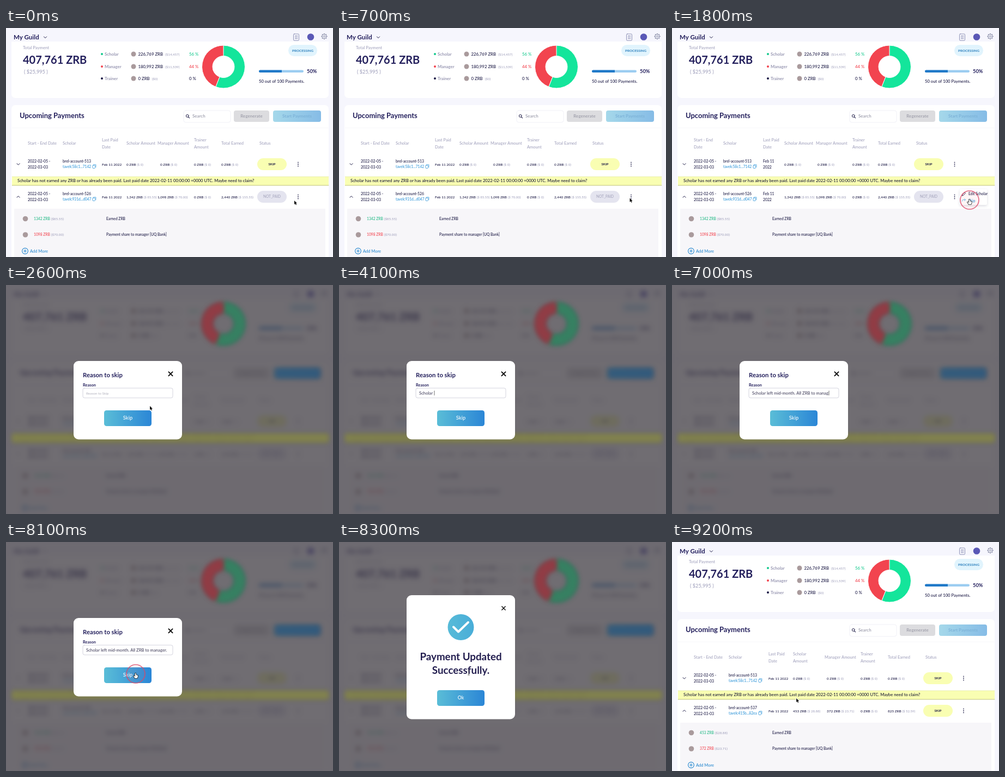
These frames come from a looping animation (600x422 px, 9.3 s). An HTML page with a canvas:

```html
<!DOCTYPE html>
<html lang="en">
<head>
<meta charset="utf-8">
<title>Skip a payment</title>
<style>
  html, body { margin: 0; width: 100%; height: 100%; overflow: hidden; background: #f6f6fd; }
  canvas { display: block; width: 600px; height: 422px; }
</style>
</head>
<body>
<canvas id="stage"></canvas>
<script>
const W = 600, H = 422, LOOP = 9300, STEP = 100;
const NAVY = '#231f5c', INK = '#1c1a45', GREY = '#a3a3be', BLUE = '#2f95d8';
const GREEN = '#14e59b', RED = '#f2444f', YELLOW = '#f9feb2', TOKEN = '#a99a9c';
const REASON = 'Scholar left mid-month. All ZRB to manager.';
const dpr = window.devicePixelRatio || 1;

function makeCanvas(canvas) {
  canvas.width = W * dpr;
  canvas.height = H * dpr;
  const context = canvas.getContext('2d');
  context.scale(dpr, dpr);
  return context;
}

const stage = makeCanvas(document.getElementById('stage'));
let ctx = stage;

// Drawing helpers
function text(str, x, y, size, color = INK, { bold = false, align = 'left' } = {}) {
  ctx.font = `${bold ? 'bold' : '500'} ${size}px Lato, sans-serif`;
  ctx.textAlign = align;
  ctx.fillStyle = color;
  ctx.fillText(str, x, y);
  return ctx.measureText(str).width;
}

function box(x, y, w, h, r, fill, stroke) {
  ctx.beginPath();
  ctx.roundRect(x, y, w, h, r);
  if (fill) { ctx.fillStyle = fill; ctx.fill(); }
  if (stroke) { ctx.strokeStyle = stroke; ctx.lineWidth = 0.8; ctx.stroke(); }
}

function disc(x, y, r, fill) {
  ctx.beginPath();
  ctx.arc(x, y, r, 0, Math.PI * 2);
  ctx.fillStyle = fill;
  ctx.fill();
}

function ring(x, y, r, color, width) {
  ctx.beginPath();
  ctx.arc(x, y, r, 0, Math.PI * 2);
  ctx.strokeStyle = color;
  ctx.lineWidth = width;
  ctx.stroke();
}

function line(points, color, width) {
  ctx.beginPath();
  points.forEach(([x, y]) => ctx.lineTo(x, y));
  ctx.strokeStyle = color;
  ctx.lineWidth = width;
  ctx.lineCap = ctx.lineJoin = 'round';
  ctx.stroke();
}

function chevron(x, y, dir, size = 2.6) {
  line([[x - size, y - dir * size / 2], [x, y + dir * size / 2], [x + size, y - dir * size / 2]], INK, 1);
}

function cross(x, y, r, width) {
  line([[x - r, y - r], [x + r, y + r]], '#000', width);
  line([[x + r, y - r], [x - r, y + r]], '#000', width);
}

function gradient(x0, x1, from, to) {
  const g = ctx.createLinearGradient(x0, 0, x1, 0);
  g.addColorStop(0, from);
  g.addColorStop(1, to);
  return g;
}

function amount(x, y, value, usd, size = 6.4, color = INK) {
  const w = text(`${value} ZRB`, x, y, size, color);
  text(`($${usd})`, x + w + size * 0.25, y, size * 0.95, GREY);
}

// Page sections
function header() {
  text('My Guild', 14, 20.5, 11.5, NAVY, { bold: true });
  chevron(72, 17.2, 1);
  box(527.5, 11, 10, 12, 1.5, null, '#757aa5');
  for (const y of [14.5, 17, 19.5]) line([[530, y], [535, y]], '#757aa5', 0.8);
  disc(559, 16.5, 6.3, '#5a58b6');
  for (let i = 0; i < 8; i++) {
    const a = i * Math.PI / 4, c = Math.cos(a), s = Math.sin(a);
    line([[584 + 4.2 * c, 15.5 + 4.2 * s], [584 + 5 * c, 15.5 + 5 * s]], '#8488a4', 1.5);
  }
  ring(584, 15.5, 4.1, '#8488a4', 0.9);
  ring(584, 15.5, 1.7, '#8488a4', 0.9);
}

function donut(green, red, gap) {
  const x = 399, y = 71.5, top = -Math.PI / 2, split = top + Math.PI * 2 * 0.56;
  const slice = (from, to, color) => {
    ctx.beginPath();
    ctx.arc(x, y, 39.5, from, to);
    ctx.arc(x, y, 20, to, from, true);
    ctx.closePath();
    ctx.fillStyle = color;
    ctx.fill();
    if (gap) { ctx.strokeStyle = gap; ctx.lineWidth = 1; ctx.stroke(); }
  };
  slice(top, split, green);
  slice(split, top + Math.PI * 2, red);
}

function summary() {
  box(10, 25, 582, 104, [0, 0, 7, 7], '#fff');
  text('Total Payment', 31, 38.5, 7.7, GREY);
  text('407,761 ZRB', 31, 66, 20, NAVY, { bold: true });
  text('( $25,995 )', 33, 84, 9.2, GREY);
  const legend = [
    ['Scholar', '226,769', '14,457', '56', '#14c98d', 51],
    ['Manager', '180,992', '11,539', '44', RED, 74],
    ['Trainer', '0', '0', '0', INK, 96]
  ];
  for (const [role, value, usd, share, color, y] of legend) {
    disc(176, y - 3, 2, color);
    text(role, 181, y, 7.8, '#9998b3', { bold: true });
    disc(234, y - 3, 4.5, TOKEN);
    const w = text(`${value} ZRB`, 242.5, y, 7.8);
    text(`($${usd})`, 246.5 + w, y, 6.2, GREY);
    text(`${share} %`, 336, y, 7.8, color);
  }
  donut(GREEN, RED, '#fff');
  box(518, 31, 53, 21, 10.5, '#e1f4fd');
  text('PROCESSING', 544.5, 44, 6.3, '#2b7fbd', { bold: true, align: 'center' });
  box(464, 77.5, 82, 4.6, 2.3, '#9ccdf1');
  box(464, 77.5, 42, 4.6, [2.3, 0, 0, 2.3], '#2079c8');
  text('50%', 552, 83, 9.3, NAVY, { bold: true });
  text('50 out of 100 Payments.', 464, 101, 7.7);
}

function toolbar() {
  box(10, 142, 582, 290, 7, '#fff');
  text('Upcoming Payments', 25, 166, 13, NAVY, { bold: true });
  box(326, 152, 86, 22, 4, '#fff', '#ececf5');
  ring(332.8, 162, 2.4, INK, 1);
  line([[334.7, 164], [336.5, 165.8]], INK, 1.1);
  text('Search', 342, 165.3, 8, '#9293a4');
  box(418, 152, 65, 21, 4, '#dcdcdf');
  text('Regenerate', 450.5, 165.2, 8, '#a4a4af', { bold: true, align: 'center' });
  box(490, 152, 88, 21, 4, gradient(490, 578, '#a5d8ea', '#86bce6'));
  text('Start Payments', 534, 165.2, 8, '#7db3d8', { bold: true, align: 'center' });
  line([[11, 184], [591, 184]], '#f5f5fa', 0.8);
}

// Column order: dates, scholar, paid, scholar/manager/trainer amounts, total, status
const layouts = {
  wide: { cols: [40, 104, 176, 221, 278, 345, 395, 465], zero: 283, dots: 536 },
  narrow: { cols: [40, 94, 167, 206, 264, 331, 378, 448], zero: 267, dots: 518.5, tight: true },
  updated: { cols: [40, 104, 177, 222, 280, 346, 396, 465], zero: 284, dots: 535, wrapScholar: true }
};

const idle = {
  name: 'brel-account-513', wallet: 'tavek:58c1...7142', sums: [['0', ' 0'], ['0', ' 0'], ['0', ' 0'], ['0', ' 0']], skip: true
};
const unpaid = {
  name: 'brel-account-526', wallet: 'tavek:931d...d047', skip: false,
  sums: [['1,342', ' 85.55'], ['1,098', ' 70.00'], ['0', ' 0'], ['2,440', ' 155.55']],
  split: [['1342', '85.55'], ['1098', '70.00']]
};
const skipped = {
  name: 'brel-account-537', wallet: 'tavek:415b...82ea', skip: true,
  sums: [['453', ' 28.88'], ['372', ' 23.71'], ['0', ' 0'], ['825', ' 52.59']],
  split: [['453', '28.88'], ['372', '23.71']]
};

function headings({ cols, tight, wrapScholar }) {
  const titles = [
    tight ? 'Start - End|Date' : 'Start - End Date', 'Scholar', 'Last Paid|Date',
    wrapScholar ? 'Scholar|Amount' : 'Scholar Amount', 'Manager Amount',
    'Trainer|Amount', 'Total Earned', 'Status'
  ];
  titles.forEach((title, i) => {
    const lines = title.split('|');
    lines.forEach((s, n) => text(s, cols[i], 215 + (n - (lines.length - 1) / 2) * 13, 7.5, GREY));
  });
}

function row(y, data, layout, dir) {
  const { cols, dots, zero, tight } = layout;
  chevron(22.5, y, dir);
  text('2022-02-05 -', cols[0], y - 2.7, 6.9);
  text('2022-03-03', cols[0], y + 7.5, 6.9);
  text(data.name, cols[1], y - 3, 6.8);
  text(data.wallet, cols[1], y + 7, 6.6, BLUE);
  box(cols[1] + 55, y + 2, 4.5, 5.5, 1, null, BLUE);
  line([[cols[1] + 56.5, y + 0.8], [cols[1] + 61, y + 0.8], [cols[1] + 61, y + 5.5]], BLUE, 0.7);
  if (tight) {
    text('Feb 11', cols[2], y - 2.7, 6.8);
    text('2022', cols[2], y + 7.5, 6.8);
  } else {
    text('Feb 11 2022', cols[2], y + 2.5, 6.5);
  }
  data.sums.forEach(([value, usd], i) => {
    const x = i === 1 && data !== unpaid ? zero : cols[i + 3];
    amount(x, y + 2.5, value, usd);
  });
  const pill = cols[7] - 4;
  box(pill, y - 11, 54, 22, 11, data.skip ? YELLOW : '#e4e4ef');
  text(data.skip ? 'SKIP' : 'NOT_PAID', pill + 27, y + 2.3, data.skip ? 6 : 6.6,
    data.skip ? INK : '#a7a7be', { bold: data.skip, align: 'center' });
  for (const dy of [-3.4, 0, 3.4]) disc(dots, y + dy, 0.9, INK);
}

function notice(fill, edge) {
  box(11, 274, 581, 16, 0, fill);
  if (!edge) return;
  line([[11, 274], [592, 274]], '#e6eaa6', 0.8);
  line([[11, 290], [592, 290]], edge, 0.9);
}

function details([earned, share]) {
  box(15, 333, 571, 95, 0, '#f7f6f9');
  disc(35.5, 351.5, 4.8, TOKEN);
  amount(51, 353.8, ...earned, 6.7, '#22b985');
  text('Earned ZRB', 184, 353.8, 6.7);
  disc(35.5, 381, 4.8, TOKEN);
  amount(51, 383.2, ...share, 6.7, RED);
  text('Payment share to manager [UQ Bank]', 184, 383.2, 6.7);
  ring(35, 411, 5.4, '#2788cf', 1.1);
  line([[32.4, 411], [37.6, 411]], '#2788cf', 1.1);
  line([[35, 408.4], [35, 413.6]], '#2788cf', 1.1);
  text('Add More', 44, 413.8, 7.5, '#2788cf');
}

function page(layout, current) {
  box(0, 0, W, H, 0, '#f6f6fd');
  header();
  summary();
  toolbar();
  headings(layout);
  row(251, idle, layout, 1);
  notice(YELLOW, '#b9bd72');
  text('Scholar has not earned any ZRB or has already been paid. Last paid date 2022-02-11 00:00:00 +0000 UTC. Maybe need to claim?',
    21, 283.7, 7.65, '#191735');
  row(311, current, layout, -1);
  details(current.split);
}

function menu() {
  ctx.save();
  ctx.shadowColor = 'rgba(40,40,80,.16)';
  ctx.shadowBlur = 5 * dpr;
  ctx.shadowOffsetY = 2 * dpr;
  box(528, 297, 50, 29, 2, '#fff');
  ctx.restore();
  line([[532.5, 309], [533, 307], [537, 303], [538.5, 304.5], [534.5, 308.5], [532.5, 309]], INK, 0.9);
  text('Edit Scholar', 544, 308, 6.7);
  line([[532, 319.5], [533.5, 316.5], [538.5, 316.5]], '#69bbe6', 0.9);
  line([[536.5, 314.5], [538.7, 316.5], [536.5, 318.5]], '#69bbe6', 0.9);
  text('Skip', 544, 321, 6.7, BLUE);
}

// Dimmed page behind the dialogs, rendered once
function makeBackdrop() {
  const sharp = document.createElement('canvas'), soft = document.createElement('canvas');
  ctx = makeCanvas(sharp);
  page(layouts.wide, unpaid);
  ctx = makeCanvas(soft);
  box(0, 0, W, H, 0, '#f6f6fd');
  ctx.filter = `blur(${5 * dpr}px)`;
  ctx.drawImage(sharp, 0, 0, W, H);
  ctx.filter = 'none';
  box(0, 0, W, H, 0, 'rgba(62,59,65,.74)');
  ctx.filter = `blur(${4 * dpr}px)`;
  ctx.globalAlpha = 0.8;
  donut('#388764', '#9a3d45');
  notice('#86884a');
  box(494, 153, 82, 19, 4, '#2c5a80');
  ctx.filter = 'none';
  ctx = stage;
  return soft;
}

function button(label, y, size) {
  box(180, y, 87, 29, 4.5, gradient(180, 267, '#5abdd7', '#2b86d6'));
  text(label, 223.5, y + 14.5 + size * 0.31, size, '#fff', { align: 'center' });
}

function reasonDialog(t) {
  box(124, 140, 199, 144.5, 9, '#fff');
  text('Reason to skip', 141, 170, 11.3, NAVY, { bold: true });
  cross(302, 163.7, 3.6, 1.8);
  text('Reason', 141, 187, 7.4, NAVY, { bold: true });
  box(141, 190, 165, 18, 3, '#fff', '#c9c9d6');
  const count = Math.max(0, Math.min(REASON.length, Math.floor((t - 3300) / 92.5)));
  let caret = 147;
  if (count) caret += text(REASON.slice(0, count), 147, 201.7, 7.7, '#46435f');
  else text('Reason to Skip', 147, 201.5, 6.4, '#b6b6c2');
  const typing = count > 0 && count < REASON.length;
  const blink = t >= 3100 && t < 8000 && t % 1000 < 500;
  if (typing || blink) line([[caret + 1, 195], [caret + 1, 203]], '#333', 0.7);
  button('Skip', 231, 9.3);
}

function successDialog() {
  box(124, 98, 199, 228.5, 9, '#fff');
  cross(302, 122, 3.2, 1.3);
  disc(223.5, 157, 24, gradient(199, 248, '#57bbd8', '#49add8'));
  line([[210, 156.5], [219, 165.5], [237, 148]], '#fff', 4);
  const style = { bold: true, align: 'center' };
  text('Payment Updated', 223.5, 218, 18.8, '#241f50', style);
  text('Successfully.', 223.5, 243, 18.8, '#241f50', style);
  button('Ok', 273, 8.8);
}

// Pointer: time, x, y
const path = [
  [0, 529, 318], [400, 529, 318], [900, 536, 311], [1150, 536, 311], [1600, 546, 316], [1900, 546, 316],
  [2600, 264, 223], [3000, 232, 200], [7300, 232, 200], [7900, 238, 243], [8300, 238, 241],
  [8800, 229, 288], [9300, 228, 288]
];
const presses = [[1000, 1100], [1700, 1900], [8000, 8200], [8900, 9100]];
const inside = (t, from, to) => t >= from && t < to;

function pointerAt(t) {
  const i = path.findIndex(p => p[0] > t);
  const [t0, x0, y0] = path[i - 1], [t1, x1, y1] = path[i];
  const u = (t - t0) / (t1 - t0), e = u * u * (3 - 2 * u);
  return [x0 + (x1 - x0) * e, y0 + (y1 - y0) * e];
}

function shape(points, fill, edge, width) {
  ctx.beginPath();
  points.forEach(([x, y]) => ctx.lineTo(x, y));
  ctx.closePath();
  ctx.lineJoin = 'round';
  ctx.strokeStyle = edge;
  ctx.lineWidth = width;
  ctx.stroke();
  ctx.fillStyle = fill;
  ctx.fill();
}

const arrow = [[0, 0], [0, 7.2], [1.7, 5.7], [2.9, 8.3], [4.1, 7.7], [3, 5.2], [5, 5]];
const hand = [[-1, 0], [0.5, 0], [0.7, 3], [4, 4], [3.6, 7], [2.5, 9], [-1.5, 9], [-4, 5], [-3, 4.5], [-1.2, 6]];

function pointer(t) {
  if (inside(t, 3300, 7300)) return;
  const [x, y] = pointerAt(t);
  if (presses.some(([from, to]) => inside(t, from, to))) {
    disc(x, y + 1, 17, 'rgba(226,80,110,.06)');
    ring(x, y + 1, 17, 'rgba(220,72,104,.8)', 1.7);
  }
  ctx.save();
  ctx.translate(x, y);
  const beam = inside(t, 2900, 7600) || inside(t, 8200, 8500);
  const overLink = inside(t, 1500, 1900) || inside(t, 7800, 8200) || inside(t, 8700, 9100);
  if (beam) {
    line([[-1.6, -4], [1.6, -4]], '#555', 0.8);
    line([[0, -4], [0, 4]], '#555', 0.8);
    line([[-1.6, 4], [1.6, 4]], '#555', 0.8);
  } else if (overLink) {
    shape(hand, '#fff', '#222', 1.6);
  } else {
    shape(arrow, '#111', '#fff', 1.6);
  }
  ctx.restore();
}

const backdrop = makeBackdrop();

function draw(t) {
  if (inside(t, 1900, 9100)) {
    ctx.drawImage(backdrop, 0, 0, W, H);
    if (t < 8200) reasonDialog(t);
    else successDialog();
  } else if (t >= 9100) {
    page(layouts.updated, skipped);
  } else if (t >= 1100) {
    page(layouts.narrow, unpaid);
    menu();
  } else {
    page(layouts.wide, unpaid);
  }
  pointer(t);
}

const start = performance.now();
function tick() {
  const t = (performance.now() - start) % LOOP;
  draw(Math.floor(t / STEP) * STEP);
  requestAnimationFrame(tick);
}
tick();
</script>
</body>
</html>
```
